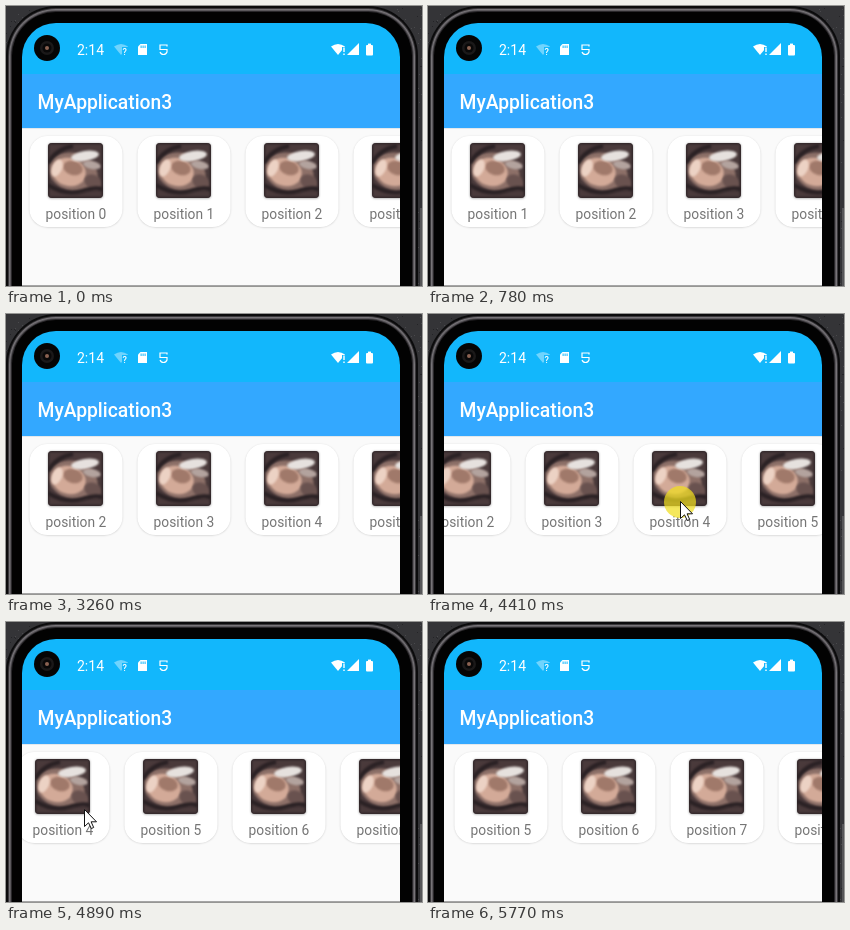
Write an HTML page with a canvas that moves like this. It is 416 by 280 pixels and loops after 8 s.

```html
<!DOCTYPE html>
<html lang="en">
<head>
<meta charset="utf-8">
<title>Carousel</title>
<style>
html, body { margin: 0; width: 100%; height: 100%; overflow: hidden; background: #111; }
canvas { display: block; width: 416px; height: 280px; }
</style>
</head>
<body>
<canvas id="stage" width="416" height="280"></canvas>
<script>
const W = 416, H = 280, LOOP = 8000, PITCH = 108, STEP = 70;
const SKY = '#12b7fc', BAR = '#33a8ff';
const ctx = document.getElementById('stage').getContext('2d');

function layer(w, h, draw) {
  const c = document.createElement('canvas');
  c.width = w;
  c.height = h;
  draw(c.getContext('2d'));
  return c;
}

function box(g, x, y, w, h, r, fill) {
  g.beginPath();
  g.roundRect(x, y, w, h, r);
  g.fillStyle = fill;
  g.fill();
}

function oval(g, x, y, rx, ry, turn, fill) {
  g.beginPath();
  g.ellipse(x, y, rx, ry, turn, 0, 7);
  g.fillStyle = fill;
  g.fill();
}

function shape(g, path, fill) {
  g.fillStyle = fill;
  g.fill(new Path2D(path));
}

function text(g, s, x, y, size, color, weight = 400) {
  g.font = `${weight} ${size}px Roboto, sans-serif`;
  g.fillStyle = color;
  g.fillText(s, x, y);
}

// Abstract stand-in for the thumbnail photo
const photo = layer(55, 55, g => {
  g.beginPath();
  g.roundRect(0, 0, 55, 55, 4);
  g.clip();
  g.fillStyle = '#4a3a3b';
  g.fillRect(0, 0, 55, 55);
  g.filter = 'blur(1.2px)';
  oval(g, 25, 29, 25, 19, 0.3, '#8d7068');
  oval(g, 21, 29, 17, 14, 0.3, '#d3aa98');
  oval(g, 25, 25, 10, 7, 0.3, '#a0796a');
  oval(g, 9, 25, 5, 9, 0.4, '#ecd2c4');
  oval(g, 37, 13, 14, 5, -0.15, '#e6e1de');
  oval(g, 44, 22, 9, 4, 0.2, '#b3a39e');
  oval(g, 45, 39, 9, 7, 0.5, '#69524f');
  g.strokeStyle = '#2a2124';
  g.lineWidth = 4;
  g.stroke(new Path2D('M0 20Q8 6 25 3M0 42Q18 53 34 48T55 47'));
  g.lineWidth = 2;
  g.strokeRect(0, 0, 55, 55);
});

function wifi(g, x, y, fill) {
  shape(g, `M${x + 7} ${y + 11}l-7 -8.5q7 -5 14 0z`, fill);
}

function statusIcons(g) {
  text(g, '2:14', 71, 49, 14, '#fff');
  wifi(g, 108, 38, 'rgba(255,255,255,.4)');
  box(g, 116, 41, 7, 9, 0, SKY);
  text(g, '?', 116.5, 49, 9, '#fff', 500);

  shape(g, 'M134.5 38H141V49H132V40.5z', '#fff');
  for (let i = 0; i < 3; i++) box(g, 134.6 + i * 2, 39.5, 1, 2.5, 0, SKY);

  g.strokeStyle = '#fff';
  g.lineWidth = 1.2;
  g.stroke(new Path2D('M161 40.5V39H154V43.5H161V46Q160 48.5 157.5 48.5T154 46'));

  wifi(g, 325, 38, '#fff');
  box(g, 336, 41, 4, 9, 0, SKY);
  box(g, 337.3, 41.5, 1.4, 4.5, 0, '#fff');
  box(g, 337.3, 47.5, 1.4, 1.5, 0, '#fff');
  shape(g, 'M341 49h12v-12z', '#fff');
  box(g, 360, 39, 7, 10.5, 1, '#fff');
  box(g, 362, 37.6, 3, 2, 0, '#fff');
}

// Everything that stays still: phone body, bars, camera
const phone = layer(W, H, g => {
  g.fillStyle = '#343437';
  g.fillRect(0, 0, W, H);
  let seed = 7;
  for (let i = 0; i < 2500; i++) {
    seed = seed * 16807 % 2147483647;
    g.fillStyle = i % 2 ? '#49494c' : '#242427';
    g.fillRect(seed % W, (seed >> 10) % H, 1, 1);
  }
  box(g, 0, 0, 412, 400, 50, '#0b0b0c');
  const rim = ['#39373a', '#777478', '#5b585c', '#29272a', '#020202'];
  rim.forEach((c, i) => box(g, 2 + i, 2 + i, 408 - 2 * i, 400, 48 - i, c));
  box(g, 414, 202, 2, 78, 0, '#565658');

  g.save();
  g.beginPath();
  g.roundRect(16, 17, 378, 300, 34);
  g.clip();
  box(g, 16, 17, 378, 51, 0, SKY);
  box(g, 16, 68, 378, 54, 0, BAR);
  box(g, 16, 122, 378, 158, 0, '#fafafa');
  box(g, 16, 122, 378, 1, 0, '#e3e8ec');
  box(g, 16, 279, 378, 1, 0, '#a5a5a5');
  g.restore();

  oval(g, 41, 42, 13, 13, 0, '#050505');
  oval(g, 41, 42, 7, 7, 0, '#1b1919');
  oval(g, 41, 42, 4.5, 4.5, 0, '#090808');
  oval(g, 41, 42, 2, 2, 0, '#8b6252');
  statusIcons(g);
  text(g, 'MyApplication3', 31.5, 102.5, 19.3, '#fff', 500);
});

const cardBase = layer(109, 109, g => {
  g.shadowColor = 'rgba(0,0,0,.18)';
  g.shadowBlur = 2;
  g.shadowOffsetY = 0.4;
  box(g, 7.5, 8, 93, 91, 18, '#fff');
  g.shadowColor = 'rgba(0,0,0,.4)';
  g.drawImage(photo, 26, 15);
});

function card(i, x) {
  ctx.drawImage(cardBase, x - 8, 122);
  text(ctx, 'position ' + i, x + 15.6, 213, 13.8, '#757575');
}

// The picture advances in steps; gives 0..1 over the given number of them
const progress = (t, start, count) =>
  Math.max(0, Math.min(1, Math.floor((t - start) / STEP + 0.15) / count));
const mix = (a, b, u) => a + (b - a) * u;
const easeOut = u => 1 - (1 - u) ** 2;
const easeBoth = u => (1 - Math.cos(Math.PI * u)) / 2;

// An automatic swipe is already under way at its first step
function swipe(t, start) {
  return t < start ? 0 : PITCH * easeOut(mix(0.28, 1, progress(t, start, 4)));
}

const DRAG = 4270, RELEASE = 4760, REACH = 229;

function scrollAt(t) {
  const drag = REACH * easeBoth(progress(t, DRAG, 7.999));
  const settle = (REACH - 2 * PITCH) * easeOut(progress(t, RELEASE + 2 * STEP, 3));
  return Math.round(swipe(t, 500) + swipe(t, 2980) + drag - settle + swipe(t, 5510));
}

function pointerAt(t) {
  if (t < 3920 || t >= 5230) return null;
  if (t < 4340) {
    const u = easeOut(progress(t, 3920, 4));
    return [mix(316, 287, u), mix(249, 189, u)];
  }
  if (t < RELEASE + STEP) return [502 - scrollAt(t), 188];
  const v = progress(t, RELEASE, 6);
  return [mix(57, 141, v ** 1.25), mix(187, 261, v ** 4)];
}

function drawPointer([x, y], pressed) {
  if (pressed) oval(ctx, x, y, 16, 16, 0, 'rgba(240,222,30,.72)');
  const arrow = new Path2D('M0 0V17L4 13.3L6.8 19L9.2 18L6.6 12.3H12z');
  ctx.save();
  ctx.translate(Math.round(x) + 0.5, Math.round(y) - 0.5);
  ctx.fillStyle = '#fff';
  ctx.fill(arrow);
  ctx.strokeStyle = '#111';
  ctx.stroke(arrow);
  ctx.restore();
}

function draw(t) {
  ctx.drawImage(phone, 0, 0);
  ctx.save();
  ctx.beginPath();
  ctx.rect(16, 123, 378, 156);
  ctx.clip();
  const s = scrollAt(t);
  for (let i = 0; i < 12; i++) {
    const x = 24 + i * PITCH - s;
    if (x > -96 && x < 396) card(i, x);
  }
  ctx.restore();
  const tip = pointerAt(t);
  if (tip) drawPointer(tip, t >= 4340 && t < RELEASE + STEP);
}

const begin = performance.now();
function tick() {
  draw((performance.now() - begin) % LOOP);
  requestAnimationFrame(tick);
}
tick();
</script>
</body>
</html>
```
